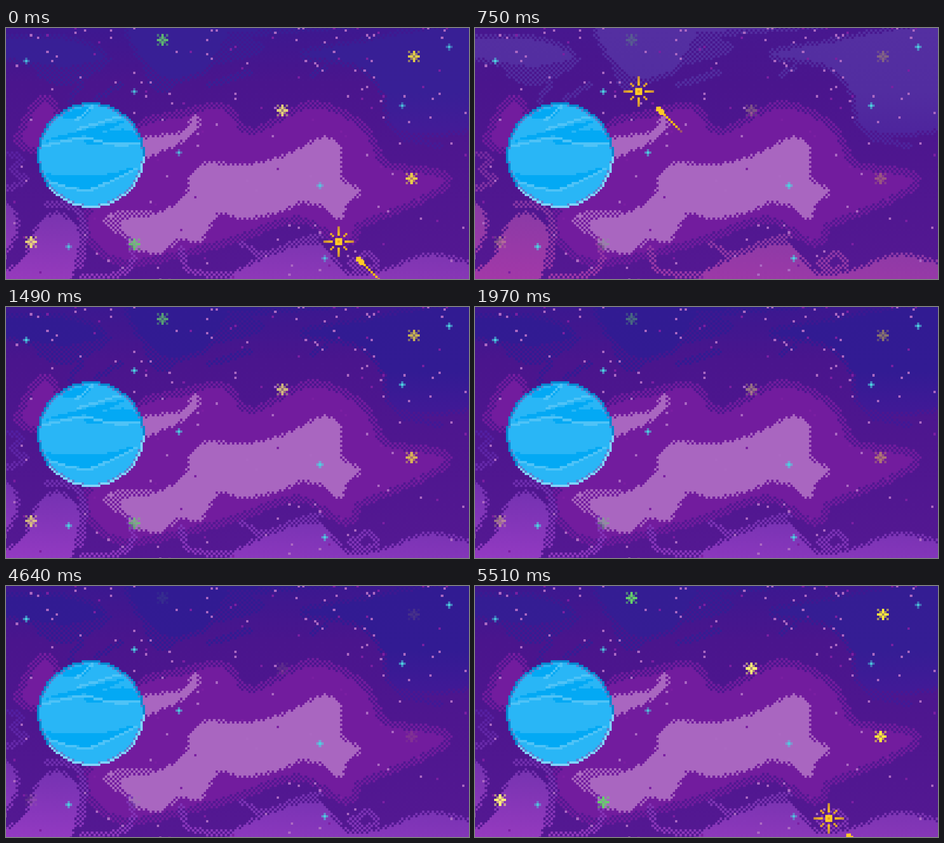
Animation, 1016 px wide and 551 px high, one loop 5.57 s. Source, as an HTML page with a canvas:

```html
<!DOCTYPE html>
<html>
<head>
<meta charset="utf-8">
<title>Pixel space</title>
<style>
html, body { margin: 0; width: 100%; height: 100%; overflow: hidden; background: #4a148c; }
canvas { display: block; }
</style>
</head>
<body>
<canvas id="view" width="1016" height="551"></canvas>
<script>
const CELL = 5.155, X0 = .8 - CELL, Y0 = -2, W = 199, H = 108;
const LOOP = 5570, STEPS = 60, UNIT = LOOP / 90;

const view = document.getElementById('view').getContext('2d');
view.imageSmoothingEnabled = false;

const makeGrid = () => Object.assign(document.createElement('canvas'), { width: W, height: H })
  .getContext('2d', { willReadFrequently: true });
const scratch = makeGrid(), scene = makeGrid();
const col = x => Math.floor((x - X0) / CELL), row = y => Math.floor((y - Y0) / CELL);
const clamp = v => Math.max(0, Math.min(1, v));

const points = text => text.split(' ').map(p => p.split(',').map(Number));

// Smooth curve through key points; closed unless open is set.
function curve(text, open) {
  const p = points(text), n = p.length, path = new Path2D();
  const at = i => open ? p[Math.max(0, Math.min(n - 1, i))] : p[(i + n) % n];
  path.moveTo(...p[0]);
  for (let i = 0; i < (open ? n - 1 : n); i++) {
    const [a, b, c, d] = [at(i - 1), at(i), at(i + 1), at(i + 2)];
    const ease = (q, from, to, s) => q.map((v, m) => v + s * (to[m] - from[m]) / 7);
    path.bezierCurveTo(...ease(b, a, c, 1), ...ease(c, b, d, -1), ...c);
  }
  return path;
}

// Which cells does a shape given in stage pixels cover?
function coverage(draw) {
  scratch.setTransform(1, 0, 0, 1, 0, 0);
  scratch.clearRect(0, 0, W, H);
  scratch.setTransform(1 / CELL, 0, 0, 1 / CELL, -X0 / CELL, -Y0 / CELL);
  scratch.lineJoin = scratch.lineCap = 'round';
  draw(scratch);
  const data = scratch.getImageData(0, 0, W, H).data;
  return (i, j) => data[(j * W + i) * 4 + 3] > 127;
}

function collect(test) {
  const p = new Path2D();
  for (let j = 0; j < H; j++)
    for (let i = 0; i < W; i++)
      if (test(i, j)) p.rect(i, j, 1, 1);
  return p;
}

const fillAll = shapes => coverage(g => shapes.forEach(s => g.fill(curve(s))));
const strokeAll = (lines, width) => coverage(g => {
  g.lineWidth = width;
  lines.forEach(s => g.stroke(curve(s, true)));
});

// Solid blobs with a checkered rim, checkered patches and checkered lines.
function cloud(blobs, rim, patches = [], lines = []) {
  const full = fillAll(blobs), patch = fillAll(patches), line = strokeAll(lines, 15);
  const edge = coverage(g => {
    g.lineWidth = rim;
    blobs.forEach(s => g.stroke(curve(s)));
  });
  return collect((i, j) => full(i, j) ||
    (i + j) % 2 === 0 && (edge(i, j) || patch(i, j) || line(i, j)));
}

const sky = cloud(
  ['-20,28 130,26 214,62 120,84 -20,56',
   '282,-10 475,-10 470,40 425,95 350,108 290,50',
   '655,60 750,38 1040,4 1040,205 860,222 830,140 770,80',
   '480,-10 760,-10 500,8'], 22,
  ['70,80 235,66 145,125 85,115', '470,5 570,40 520,68 440,80', '300,75 400,100 335,145'],
  ['140,160 165,125', '200,155 250,125', '445,125 535,98', '670,105 700,85', '870,240 955,260']);

const nebula = cloud(
  ['80,165 110,200 70,258 35,242',
   '290,225 395,195 470,178 540,236 670,176 778,220 830,305 960,330 900,374 775,425 745,465 640,412 470,466 280,508 205,480 180,425 210,370'],
  34);

const glow = cloud(
  ['298,246 385,231 414,195 420,214 380,250 300,282',
   '405,330 440,299 525,303 595,288 640,270 700,242 732,266 735,330 775,358 745,385 735,418 700,392 648,380 600,402 520,416 465,405 425,466 380,460 340,490 285,480 252,425 330,410 395,372'],
  12, ['212,428 240,403 330,400 270,430 280,470 240,450']);

const low = cloud(
  ['-10,556 45,505 70,440 110,409 155,440 155,500 120,570',
   '-10,390 20,410 18,455 -10,490',
   '515,565 560,510 680,475 745,540 830,535 930,500 1040,530 1040,570'],
  16, [],
  ['0,276 34,285 14,310 46,335 0,353', '90,385 150,395 172,440 165,520',
   '270,465 280,505 250,540 170,547', '384,485 400,530 460,542 530,540',
   '520,472 560,497 640,470 690,455', '755,520 790,495 815,515 785,530 755,520']);

const bands = [
  ['#03a9f4', collect(fillAll([
    '115,192 186,172 165,199', '80,250 170,224 256,204 230,222 165,238',
    '172,240 262,222 300,250 190,255', '88,320 200,325 288,304 215,345 175,354 110,340']))],
  ['#4fc3f7', collect(strokeAll([
    '80,260 165,243 240,256 297,254', '155,222 230,200 254,195',
    '190,172 155,202', '95,338 180,356 289,308'], 5.5))]
];

// The planet's rim follows from how each cell touches the outside.
const inside = (i, j) => Math.hypot((i - 36.5) / 22.8, (j - 54) / 22.3) <= 1;
const lit = (i, j) => j > 54 && j - 54 + (i - 36.5) / 2 > 4;
const side = (i, j) => inside(i, j) &&
  !(inside(i - 1, j) && inside(i + 1, j) && inside(i, j - 1) && inside(i, j + 1));
const corner = (i, j) => inside(i, j) && !side(i, j) &&
  !(inside(i - 1, j - 1) && inside(i + 1, j - 1) && inside(i - 1, j + 1) && inside(i + 1, j + 1));
const planet = [
  ['#29b6f6', collect(inside)],
  ...bands,
  ['#5f7fd0', collect(corner)],
  ['#0288d1', collect((i, j) => side(i, j) && !lit(i, j))],
  ['#81d4fa', collect((i, j) => side(i, j) && lit(i, j))]
];

// Scattered specks, denser towards the top.
function specks(count, seed) {
  const random = () => (seed = seed * 16807 % 2147483647) / 2147483647;
  const p = new Path2D();
  for (let n = 0; n < count; n++)
    p.rect(Math.floor(random() * W), Math.floor(random() ** 1.5 * H), 1, 1);
  return p;
}
const paleSpecks = specks(120, 4711), deepSpecks = specks(55, 90210);

const tiny = points('44,72 281,140 379,273 688,345 868,171 972,42 137,480 699,505');
const twinkles = [
  ['#66d06a', points('344,26 282,474')],
  ['#ffeb3b', points('895,62 889,330')],
  ['#fff176', points('606,181 55,469')]
];

const mix = (a, b, t) => `rgb(${a.map((v, i) => v + (b[i] - v) * t)})`;

function ramp(tilt, ...stops) {
  const g = scene.createLinearGradient(0, 0, -tilt * H, H);
  for (const [y, color] of stops) g.addColorStop(y / H, color);
  return g;
}

function paint(color, path) {
  scene.fillStyle = color;
  scene.fill(path);
}

function drawTiny(alpha) {
  scene.fillStyle = '#4dd0e1';
  for (const [x, y] of tiny) {
    const i = col(x), j = row(y);
    scene.globalAlpha = alpha * .55;
    scene.fillRect(i - 1, j, 3, 1);
    scene.fillRect(i, j - 1, 1, 3);
    scene.globalAlpha = alpha;
    scene.fillRect(i, j, 1, 1);
  }
  scene.globalAlpha = 1;
}

function drawTwinkles(alpha) {
  for (const [color, places] of twinkles) {
    scene.fillStyle = color;
    for (const [x, y] of places)
      for (let a = -2; a <= 2; a++)
        for (let b = -2; b <= 2; b++) {
          const p = Math.abs(a), q = Math.abs(b);
          if (p + q === 3) continue;
          scene.globalAlpha = alpha * (p === q ? .55 : 1);
          scene.fillRect(col(x) + a, row(y) + b, 1, 1);
        }
  }
  scene.globalAlpha = 1;
}

function square(x, y, w = CELL, h = w) {
  view.fillRect(x - w / 2, y - h / 2, w, h);
}

function drawFlash(size, alpha) {
  view.globalAlpha = alpha;
  view.fillStyle = 'rgb(209,185,159)';
  for (let n = -7; n <= 7; n++) {
    const half = 49 * size * Math.sqrt(Math.max(0, 1 - (n * CELL / (39 * size)) ** 2));
    square(0, n * CELL, 2 * Math.round(half / CELL) * CELL, CELL);
  }
  square(-70 * size, 0, 31, CELL);
  square(70 * size, 0, 21, CELL);
  square(0, 46 * size);
}

function drawComet(k) {
  const ending = k > 10;
  view.save();
  view.translate(730 - 46.35 * k, 469 - 41.2 * k);

  view.fillStyle = '#ffc107';
  for (let n = 0; n < 8; n++) {
    view.globalAlpha = (ending ? .18 : 1) * Math.min(1, (8 - n) / 3);
    square(57 + CELL * n, 51.5 + CELL * n);
  }
  view.globalAlpha = 1;
  view.fillStyle = '#ffca28';
  square(46, 41, 3 * CELL, CELL);
  square(46, 41, CELL, 3 * CELL);
  if (!ending) {
    square(43.5, 38.5, 2 * CELL);
    square(51, 46.3, 2 * CELL);
  }

  if (k >= 10) drawFlash(.5 + .5 * Math.min(1, k - 10), .7 - .3 * Math.abs(k - 11));
  view.globalAlpha = ending ? .55 : 1;
  const ray = view.createLinearGradient(13, 0, 33, 0);
  ray.addColorStop(0, '#ffc61c');
  ray.addColorStop(1, '#c98a3a');
  for (let arm = 0; arm < 4; arm++) {
    view.fillStyle = ray;
    view.fillRect(13, -CELL / 2, 20.5, CELL);
    view.fillStyle = '#e0a030';
    if (!ending) {
      square(12.5, 12.5, 5);
      square(16.5, 16.5, 5);
    }
    view.rotate(Math.PI / 2);
  }
  view.fillStyle = '#ffca28';
  square(0, 0, 3 * CELL);
  view.fillStyle = '#e8a020';
  square(0, 0);
  view.restore();
}

function draw(step) {
  const k = step >= 56 ? step - STEPS : step;     // signed step around the loop start
  const warm = k < 14 ? clamp((k + 2) / 13) : 0;
  const shine = step >= 49 ? clamp((step - 49) / 10)
    : step < 14 ? .85 * Math.exp(-.14 * step)
    : .85 * clamp((28 - step) / 14);

  scene.fillStyle = ramp(0, [0, mix([59, 24, 144], [75, 23, 143], warm)], [24, '#4a158d'], [H, '#541892']);
  scene.fillRect(0, 0, W, H);
  paint(ramp(0, [0, mix([49, 27, 146], [94, 53, 165], warm)],
    [28, mix([50, 27, 147], [92, 51, 164], warm)],
    [44, mix([64, 25, 150], [82, 40, 159], warm)]), sky);
  paint('#721c9e', nebula);
  paint('#a966c0', glow);
  paint(ramp(.08, [52, mix([80, 30, 160], [128, 46, 160], warm)],
    [78, mix([118, 50, 178], [146, 60, 162], warm)],
    [107, mix([148, 58, 194], [168, 56, 160], warm)]), low);
  paint('#7b1fa2', deepSpecks);
  paint('#ab69c2', paleSpecks);
  for (const [color, path] of planet) paint(color, path);
  drawTiny(k < 5 ? 1 - .3 * clamp(1 - Math.abs(k) / 5) : 1);
  if (shine > 0) drawTwinkles(shine);

  view.globalAlpha = 1;
  view.drawImage(scene.canvas, X0, Y0, W * CELL, H * CELL);
  if (k >= -3 && k < 14) drawComet(k);
}

// Steps alternate between two time units and one.
let last = -1;
function tick() {
  const unit = Math.floor((performance.now() % LOOP + 12) / UNIT) % 90;
  const step = 2 * Math.floor(unit / 3) + (unit % 3 === 2 ? 1 : 0);
  if (step !== last) draw(last = step);
  requestAnimationFrame(tick);
}
tick();
</script>
</body>
</html>
```
